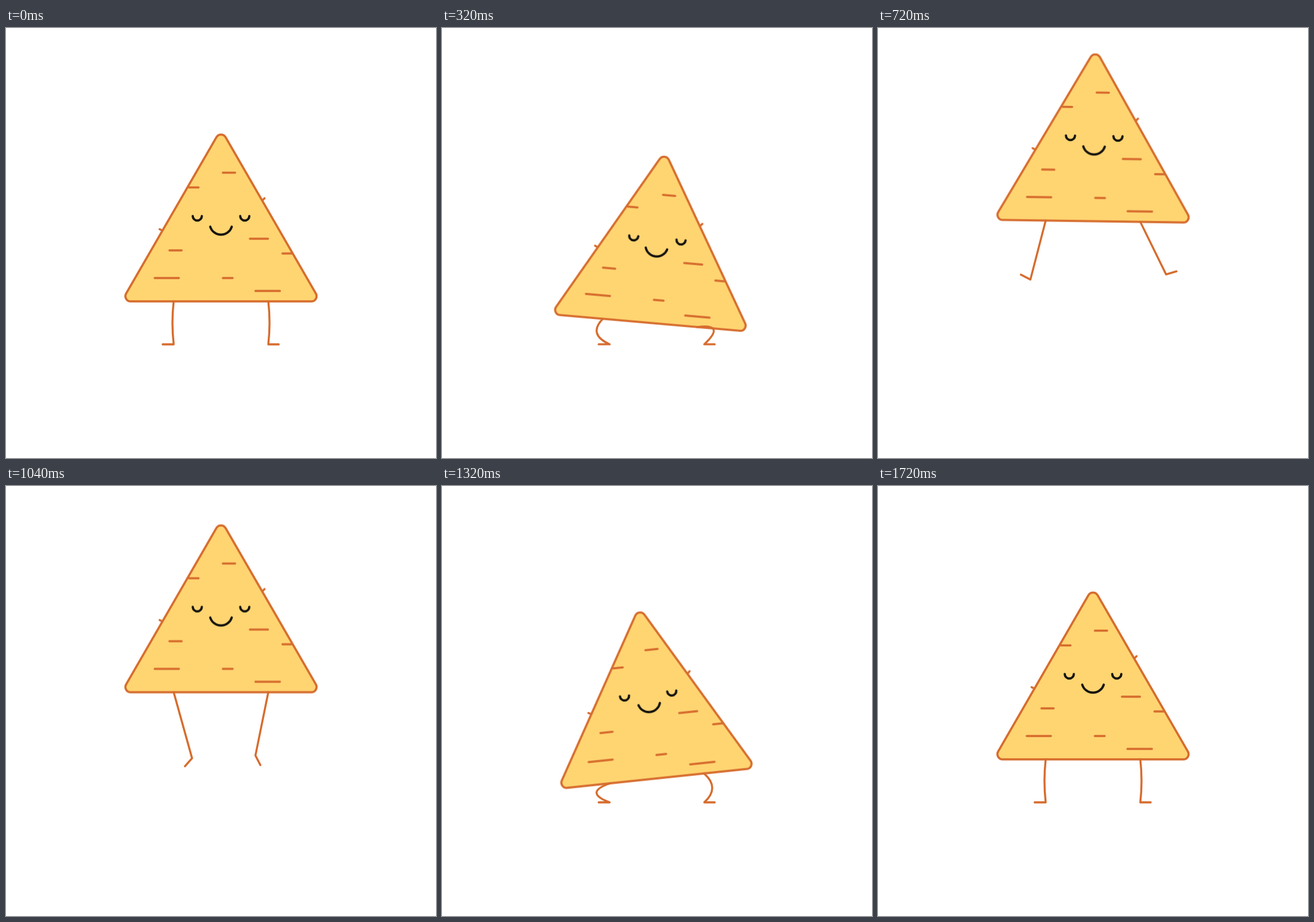
Recreate the animation shown at these times as an HTML page without scripts. Size 700 by 700 pixels, loop 2 s.

```html
<!DOCTYPE html>
<html lang="en">
<head>
<meta charset="utf-8">
<title>Hopping chip</title>
<style>
html, body { margin: 0; width: 100%; height: 100%; overflow: hidden; background: #fff; }
svg { display: block; width: 100%; height: 100%; }

/* one easing per phase, shared by body and legs so the hips stay attached */
:root {
  --crouch: cubic-bezier(.4, 0, .55, 1);
  --push: cubic-bezier(.45, 0, .75, .64);
  --rise: cubic-bezier(.33, .5, .67, .9);
  --float: cubic-bezier(.45, .05, .8, .6);
  --drop: cubic-bezier(.4, .2, .75, .55);
  --land: cubic-bezier(.33, .45, .6, 1);
}

path { fill: none; stroke: #d66c2e; stroke-width: 3.3; stroke-linecap: round; stroke-linejoin: round; }
.chip { fill: #ffd571; stroke-width: 3.5; }
.face { stroke: #15130f; stroke-width: 3.7; }

.body { transform-origin: 350px 445px; animation: hop 2s infinite; }
.left { animation: left 2s infinite; }
.right { animation: right 2s infinite; }

@keyframes hop {
  0%, 86%, 100% { transform: translate(0, 0) rotate(0deg); animation-timing-function: var(--crouch); }
  16% { transform: translate(-11.5px, 35.3px) rotate(5deg); animation-timing-function: var(--push); }
  28% { transform: translate(0, -75.5px) rotate(3.1deg); animation-timing-function: var(--rise); }
  36% { transform: translate(0, -130.5px) rotate(.8deg); animation-timing-function: var(--float); }
  52% { transform: translate(0, -109.5px) rotate(0deg); animation-timing-function: var(--drop); }
  60% { transform: translate(0, -42px) rotate(-3deg); animation-timing-function: var(--land); }
  66% { transform: translate(0, 31px) rotate(-6deg); animation-timing-function: var(--crouch); }
}

/* each leg runs toe, ankle, knee, hip */
@keyframes left {
  0%, 86%, 100% { d: path("M255 515L273 515Q269 480 273 445"); animation-timing-function: var(--crouch); }
  16% { d: path("M255 515L273 515Q237 499 261.8 473.6"); animation-timing-function: var(--push); }
  28% { d: path("M256 495.5L272.5 489Q273 427 273 365.3"); animation-timing-function: var(--rise); }
  36% { d: path("M232.5 401.5L248 409.5Q260.5 361 273 313.4"); animation-timing-function: var(--float); }
  52% { d: path("M291.5 456L303 443Q288 389 273 335.5"); animation-timing-function: var(--drop); }
  60% { d: path("M255 515L273 515Q273 461 273 407"); animation-timing-function: var(--land); }
  66% { d: path("M255 515L273 515Q230 499 273.4 484"); animation-timing-function: var(--crouch); }
}
@keyframes right {
  0%, 86%, 100% { d: path("M444 515L427 515Q431 480 427 445"); animation-timing-function: var(--crouch); }
  16% { d: path("M444 515L427 515Q463 481 415.2 487"); animation-timing-function: var(--push); }
  28% { d: path("M443.5 495.5L427.5 488.5Q427 431 427 373.7"); animation-timing-function: var(--rise); }
  36% { d: path("M486 396L469 401Q448 358 427 315.6"); animation-timing-function: var(--float); }
  52% { d: path("M414 454L406 438.5Q416.5 387 427 335.5"); animation-timing-function: var(--drop); }
  60% { d: path("M444 515L427 515Q427 457 427 399"); animation-timing-function: var(--land); }
  66% { d: path("M444 515L427 515Q453 491 426.6 468"); animation-timing-function: var(--crouch); }
}
</style>
</head>
<body>
<svg viewBox="0 0 700 700">
  <defs>
    <path id="eye" class="face" d="M-7.4 0a7.4 7.4 0 0 0 14.8 0"/>
  </defs>
  <g class="body">
    <path d="M417 281l4-4M255 330l-5-2.5"/>
    <path class="chip" d="M203 445A8.5 8.5 0 0 1 195.6 432.2L342.6 177.7A8.5 8.5 0 0 1 357.4 177.7L504.4 432.2A8.5 8.5 0 0 1 497 445Z"/>
    <path d="M353 235.5h20M298 259.5h15.5M397 343h29.5M450 367h15M266 362h20M242 407h39.5M353 407h16M406 428h40"/>
    <use href="#eye" x="311.4" y="306"/>
    <use href="#eye" x="388.7" y="306"/>
    <path class="face" d="M332.5 323.5a18.3 18.3 0 0 0 35 0"/>
  </g>
  <path class="left"/>
  <path class="right"/>
</svg>
</body>
</html>
```
